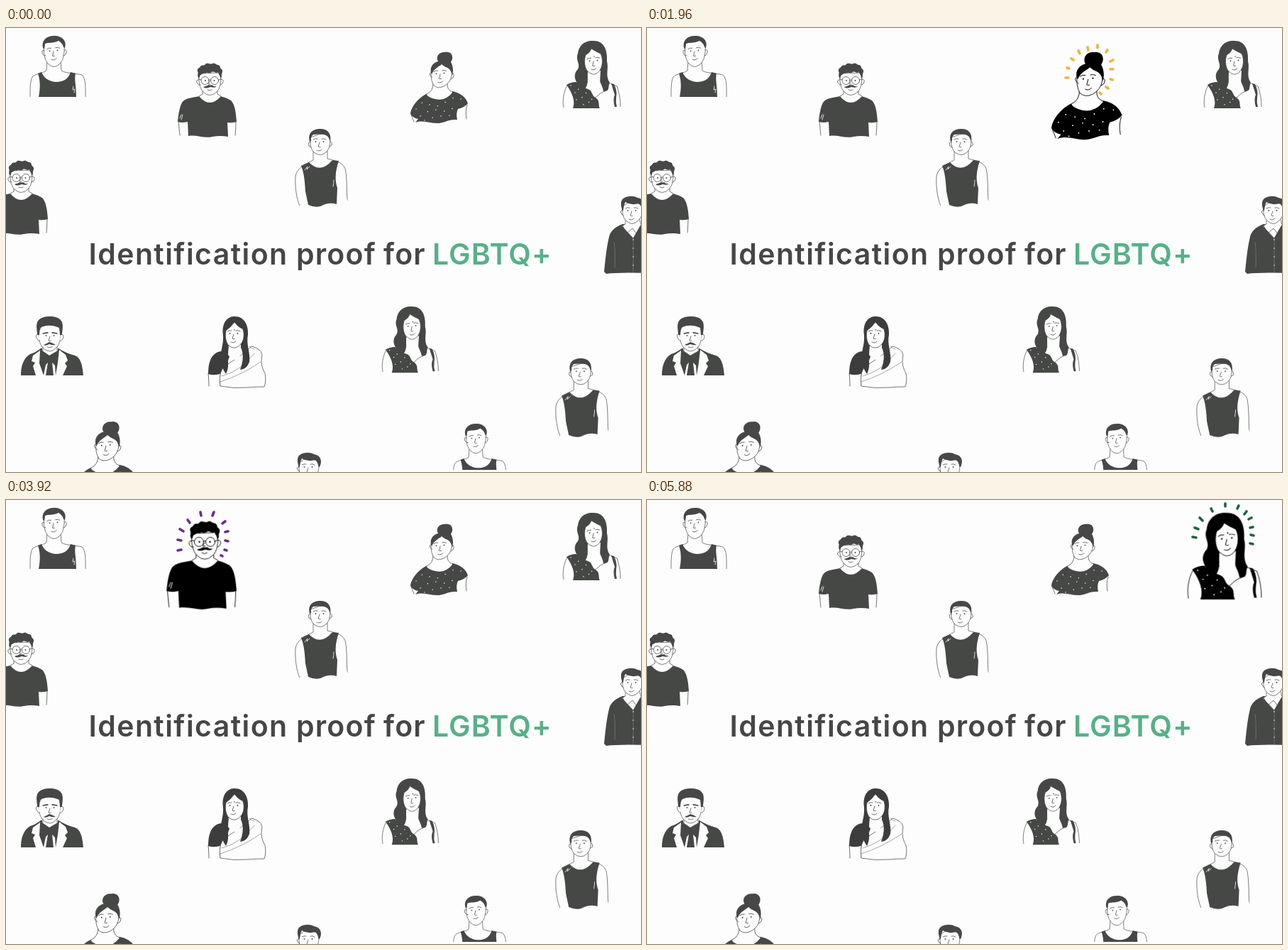
An HTML page that plays this animation: 895x625 px, repeating every 6860 ms.

```html
<!DOCTYPE html>
<html lang="en">
<head>
<meta charset="utf-8">
<title>Identification proof</title>
<style>
html, body { margin: 0; width: 100%; height: 100%; overflow: hidden; background: #fdfdfd; }
svg { display: block; width: 895px; height: 625px; color: #464846; }
.skin { fill: #fdfdfd; stroke: currentColor; stroke-width: .7; }
.ink { fill: currentColor; }
.line { fill: none; stroke: currentColor; stroke-width: .75; stroke-linecap: round; stroke-linejoin: round; }
.paper { fill: #fdfdfd; }
.mark { fill: none; stroke: #fdfdfd; stroke-width: .8; stroke-linecap: round; }
.dots { fill: none; stroke: #fdfdfd; stroke-width: 1.5; stroke-linecap: round; stroke-dasharray: 0 12; }
.rays { fill: none; stroke-width: 3.6; stroke-linecap: round; visibility: hidden; }
.hot, .rays {
  animation: pop 6860ms step-end infinite;
  animation-delay: calc(var(--i) * 980ms - 6860ms);
}
.rays { animation-name: shine; }
@keyframes pop {
  0% { color: #000; transform: scale(var(--s)); }
  14.285714%, 100% { color: var(--rest, #464846); transform: none; }
}
@keyframes shine {
  0% { visibility: visible; }
  14.285714%, 100% { visibility: hidden; }
}
text { font: 600 41px Inter, "Open Sans", sans-serif; fill: #464646; }
</style>
</head>
<body>
<svg viewBox="0 0 895 625">
<defs>
  <!-- Facial features, centred between the eyes -->
  <g id="eyes">
    <path class="line" d="M-9-3q3-2 6-1M3-4q3-1 6 1M0 1l-2 6q1 1 3 .500"/>
    <circle class="ink" cx="-5.500" cy="0" r=".9"/><circle class="ink" cx="5.500" cy="0" r=".9"/>
  </g>
  <g id="face">
    <use href="#eyes"/>
    <path class="line" d="M-4 12q4 2.500 7-1"/>
  </g>

  <g id="tank">
    <path class="skin" d="M34 97C34 85 34 75 37 69C41 64 52 64 57 60L58 46H77L78 60C84 64 96 63 107 66C113 71 112 86 112 97"/>
    <path class="ink" d="M45 64L50 62C53 70 60 75 70 76C82 76 88 71 91 62L98 64C96 73 99 79 99 97L46 97C48 88 49 75 45 64Z"/>
    <path class="mark" d="M95 82l-1 5 3-1-1 5"/>
    <path class="skin" d="M54 24C52 36 55 46 60 51Q67 58 75 51C81 46 83 35 82 23L72 15H58Z"/>
    <path class="line" d="M54 32q-4-2-3 3 2 5 5 4M82 31q4-1 3 3-1 5-4 5"/>
    <path class="ink" d="M52 28C50 19 55 11 68 11C80 11 86 19 83 28L81 27C80 22 77 20 74 18C66 22 60 20 55 22L54 30Z"/>
    <use href="#face" transform="translate(67 32) rotate(-5)"/>
  </g>

  <g id="curly">
    <path class="line" d="M243 131q1 10 2 20M324 131q0 10-1 20"/>
    <path class="ink" d="M273 96C261 98 252 99 248 105C244 113 243 123 242 132Q249 134 256 132L257 152C270 150 279 156 291 153Q302 151 313 153L312 133Q319 134 325 132C324 120 323 108 317 102Q311 98 302 96Z"/>
    <path class="paper" d="M272 96L277 92V85H298V92L303 96Q287 114 272 96Z"/>
    <path class="line" d="M277 86V93L272 96M298 86V93L303 96"/>
    <path class="mark" d="M245 127l2-5M247 129l2-7"/>
    <path class="skin" d="M272 64C271 76 273 85 278 90Q287 99 297 90C302 85 304 75 302 63Z"/>
    <path class="line" d="M272 73q-4-1-3 4 2 4 5 3M303 72q4 0 3 4-1 4-4 4"/>
    <path class="ink" d="M272 71C268 66 272 65 270 61C269 56 273 57 274 54C276 51 279 54 281 51C284 48 288 52 291 50C294 48 296 52 299 52C303 53 301 57 304 58C307 62 303 63 304 69L302 71C302 66 299 65 299 62C296 65 293 60 290 62C286 65 284 61 281 64C278 62 276 66 274 66Z"/>
    <g class="line"><circle cx="280.500" cy="74" r="5.500"/><circle cx="294" cy="74" r="5.500"/><path d="M286 73h2.500M275 73l-3-1M299.500 73l3-1M287 75l-2 4h3M284 87q3 2 6 0"/></g>
    <circle class="ink" cx="281" cy="74" r="1"/><circle class="ink" cx="293.500" cy="74" r="1"/>
    <path class="ink" d="M278 83Q282 82 286 80Q288 81 290 80Q293 83 297 82Q295 85 288 83Q281 86 278 83Z"/>
  </g>

  <g id="crop">
    <path class="skin" d="M414 250C410 242 407 225 408 209C410 197 420 193 433 186V172H453V184C462 186 475 189 478 198C481 211 480 229 481 243"/>
    <path class="paper" d="M414 250L421 195H467L481 243L467 249Z"/>
    <path class="ink" d="M416 194Q422 191 427 189Q443 206 460 186L469 187C463 205 464 216 467 225L466 248C457 245 449 248 443 251Q435 253 426 249L422 230C421 214 420 204 416 194Z"/>
    <path class="mark" d="M421 200l4-5-1 4 4-4M462 214q0 5-1 9"/>
    <path class="skin" d="M429 154C428 164 430 171 434 175Q443 182 451 175C456 170 458 162 456 153L446 148Z"/>
    <path class="line" d="M429 161q-4-1-2 5l3 2M457 160q3 0 2 5l-3 2"/>
    <path class="ink" d="M428 160C425 149 431 142 443 142C454 142 459 149 457 160L455 155Q453 151 449 150Q440 149 433 150Q429 153 430 159Z"/>
    <use href="#face" x="442" y="160"/>
  </g>

  <g id="bun">
    <path class="line" d="M571 122q2 5 4 10M650 108q-3 9-1 20"/>
    <path class="ink" d="M592 93C582 98 571 110 570 121Q574 127 581 128L577 133C588 129 597 134 607 134C619 134 623 128 636 129Q634 120 637 114Q646 112 651 106C648 97 640 91 629 89Z"/>
    <path class="dots" d="M578 114Q588 99 596 107T620 104T642 101M584 124Q600 112 612 116T637 107M590 130Q606 123 632 123"/>
    <path class="paper" d="M602 76H622L624 86Q630 88 629 91Q618 105 601 99Q593 96 593 93L601 88Z"/>
    <path class="line" d="M602 76Q603 89 593 93M622 78Q621 87 629 90"/>
    <path class="skin" d="M600 57C598 69 600 76 603 81Q609 86 617 82C626 77 630 69 628 56L613 49Z"/>
    <path class="line" d="M600 63q-4-1-2 4l3 3M629 64q4 0 1 6l-3 2"/>
    <path class="ink" d="M609 47C605 40 611 33 619 34C628 32 632 41 627 48C630 53 631 60 629 67C628 62 626 58 622 56Q617 54 614 51C610 55 604 56 600 65C596 57 601 49 609 47Z"/>
    <use href="#face" transform="translate(612 64) rotate(-4)"/>
  </g>

  <g id="wavy">
    <path class="skin" d="M786 112C784 103 786 89 791 81Q801 75 820 76L838 74Q853 78 861 82Q866 95 866 111"/>
    <path class="ink" d="M790 80Q796 76 804 76C808 84 816 84 820 86C827 88 825 95 831 98C838 103 834 108 837 113L799 113C803 103 798 91 790 80Z"/>
    <path class="dots" d="M796 81L808 87 817 91 824 98 831 108M802 91L809 96 818 101 825 108M804 101L812 106 818 111"/>
    <path class="ink" d="M853 78L857 79Q862 89 860 98Q859 105 861 111L858 111Q855 100 858 94Z"/>
    <path class="line" d="M831 98Q839 90 844 89"/>
    <path class="ink" d="M826 18C814 18 807 26 806 36C802 45 810 50 806 58C800 64 801 72 805 77C804 82 811 84 816 86C822 78 819 69 820 63H837C833 73 841 80 842 89C852 90 848 82 851 77C844 67 850 57 847 47C848 31 843 17 826 18Z"/>
    <path class="paper" d="M820 60H838L837 78Q828 84 820 77Z"/>
    <path class="skin" d="M817 38C814 47 816 57 820 61Q828 69 835 62C841 56 842 44 838 36Q831 33 825 29Q823 35 817 38Z"/>
    <circle class="ink" cx="829" cy="40" r=".8"/>
    <use href="#face" transform="translate(828 46) rotate(-5)"/>
  </g>

  <g id="drape">
    <path class="line" d="M285 486Q286 495 286 504M302 486v17"/>
    <path class="ink" d="M304 455C292 456 285 466 285 487Q294 490 304 486L316 461Z"/>
    <path class="skin" d="M302 504C301 493 301 484 307 477C320 468 334 460 346 448Q359 451 361 460C359 471 360 477 365 486Q367 497 364 505Q351 505 342 506Q321 508 302 504Z"/>
    <path class="line" stroke-opacity=".6" d="M304 490Q331 483 350 458M302 498Q331 489 359 470M343 448q4 4 7 4"/>
    <path class="ink" d="M321 406C309 407 304 419 306 432C307 446 302 453 303 465Q303 478 310 487Q314 479 313 469L315 451L331 450Q337 462 330 481Q339 481 343 470C345 458 338 445 341 432C342 419 336 405 321 406Z"/>
    <path class="paper" d="M314 445H331V460Q322 474 313 460Z"/>
    <path class="skin" d="M310 426C308 436 311 444 314 447Q322 454 330 446C336 440 336 431 334 424Q326 420 322 414Q317 421 310 426Z"/>
    <circle class="ink" cx="322" cy="425" r=".8"/>
    <use href="#face" x="321" y="430"/>
  </g>

  <g id="suit">
    <path class="ink" d="M21 489C21 477 24 465 34 459Q43 456 49 451H74Q85 458 97 461C106 464 108 477 109 489Z"/>
    <path class="paper" d="M48 454L38 461 36 469 41 471 38 476 42 489H53L47 472ZM75 453L84 460 87 468 83 472 86 476 80 489H70L73 471Z"/>
    <path class="paper" d="M51 446H73V454L61 461 51 454ZM56 474L59 471 56 489H53ZM65 471L69 475 70 489H67Z"/>
    <path class="line" d="M52 446v8M72 446v8"/>
    <path class="skin" d="M46 421C45 435 47 445 52 450Q62 460 71 450C77 444 78 433 76 419L60 413Z"/>
    <path class="skin" d="M46 432q-5-2-3 4 2 5 5 4M77 432q4-2 4 3-1 5-5 5"/>
    <path class="ink" d="M44 432C44 425 41 417 46 411C50 407 56 406 62 406C70 406 76 408 79 414C81 420 79 427 79 432L76 432L75 422Q62 416 50 421Q47 424 47 432Z"/>
    <use href="#eyes" x="62" y="433"/>
    <path class="line" style="stroke-width:1.300" d="M52 430l7-1M65 429l7 1"/>
    <path class="line" d="M58 449q4 2 7 0"/>
    <path class="ink" d="M53 446Q58 444 61 442Q65 443 70 446Q66 447 61 445Q56 448 53 446Z"/>
  </g>

  <g id="shirt">
    <path class="ink" d="M869 276C859 280 852 285 850 294C846 311 845 325 843 343L846 346Q869 343 925 346C921 325 922 304 915 289Q906 281 894 278Z"/>
    <path class="skin" d="M873 265H892L895 277 884 296 868 279 873 276Z"/>
    <path class="line" d="M869 277L874 290 883 282 890 291 896 278"/>
    <path class="mark" d="M884 295V346M857 302q2 10 1 35" stroke-opacity=".25"/>
    <path class="dots" d="M884 298V345"/>
    <path class="skin" d="M869 251C868 263 871 269 875 272Q883 279 890 272C897 266 898 258 896 249L881 243Z"/>
    <path class="line" d="M869 257q-4-1-2 4l3 3"/>
    <path class="ink" d="M869 257C866 250 866 243 870 240C876 236 885 236 890 239C898 240 903 247 898 257L896 256Q896 251 892 247Q881 250 873 245Q871 248 870 257Z"/>
    <use href="#face" x="882" y="257"/>
  </g>
  <clipPath id="cut"><path d="M620 550H720V622H620Z"/></clipPath>
</defs>

<rect width="895" height="625" fill="#fdfdfd"/>

<use href="#tank"/>
<g clip-path="url(#cut)"><use href="#tank" transform="translate(597.4 546.4) scale(.96)"/></g>
<use href="#curly" x="-266" y="137"/>
<use href="#crop"/>
<use href="#bun" transform="translate(-532.4 516.9) scale(1.1)"/>
<use href="#wavy" transform="translate(-239.3 374.4) scale(.98)"/>
<use href="#shirt"/>
<use href="#shirt" x="-456" y="361"/>

<g style="--i:1">
  <g class="hot" style="--s:1.2;transform-origin:21px 489px"><use href="#suit"/></g>
  <path class="rays" stroke="#e8782e" d="M30 420h5M31 406l5 2M37 391l4 4M51 378l3 5M69 374v6M88 377l-2 5M101 390l-4 4M106 404l-5 2M107 420h-4M104 434l-3-1"/>
</g>
<g style="--i:2">
  <g class="hot" style="--s:1.23;transform-origin:570px 33px"><use href="#bun"/></g>
  <path class="rays" stroke="#efb23e" d="M590 70h4M592 56l3 1M598 43l3 2M608 32l2 4M621 27l1 4M635 24v4M649 31l-2 3M657 45l-4 2M657 58h-4M656 73l-3-1M650 85l-3-2M640 93l-2-2"/>
</g>
<g style="--i:3;--rest:#3d3d3e">
  <g class="hot" style="--s:1.215;transform-origin:366px 507px"><use href="#drape"/></g>
  <path class="rays" stroke="#d9523c" d="M275 429h4M277 407l4 2M283 393l4 3M295 381l3 4M310 375l1 4M326 378l-1 3M335 387l-3 3M342 399l-3 2M347 412l-4 1M348 425h-4"/>
</g>
<g style="--i:4">
  <g class="hot" style="--s:1.19;transform-origin:325px 153px"><use href="#curly"/></g>
  <path class="rays" stroke="#6a2c91" d="M242 71l5-1M242 56l5 1M245 41l5 3M256 28l3 4M274 17l1 5M293 17l-2 5M309 30l-4 3M313 44l-4 1M313 58l-4-1M311 71l-3-1M305 79l-2-1"/>
</g>
<g style="--i:5">
  <g class="hot" style="--s:1.27;transform-origin:848px 577px"><use href="#crop" transform="translate(362.9 321.6) scale(1.01)"/></g>
  <path class="rays" stroke="#2b5ba8" d="M760 473l6-1M762 457l5 2M767 441l4 4M781 430l3 4M802 425v4M820 432l-2 4M829 446l-4 2M830 456h-4M829 468l-3-1M823 481l-2-2"/>
</g>
<g style="--i:6">
  <g class="hot" style="--s:1.285;transform-origin:866px 18px"><use href="#wavy"/></g>
  <path class="rays" stroke="#1b6440" d="M769 52l5 1M772 39l5 2M779 25l4 4M795 12l2 4M815 5v4M834 8l-2 4M845 16l-3 4M852 25l-4 2M854 38l-4 1M855 50l-4-1M854 62l-4-1"/>
</g>

<text y="333"><tspan x="116.500" letter-spacing="1.4">Identification</tspan> <tspan x="409" letter-spacing="1.2">proof</tspan> <tspan x="532" letter-spacing="1.2">for</tspan> <tspan x="601" letter-spacing="1" fill="#57b088">LGBTQ+</tspan></text>
</svg>
</body>
</html>
```
